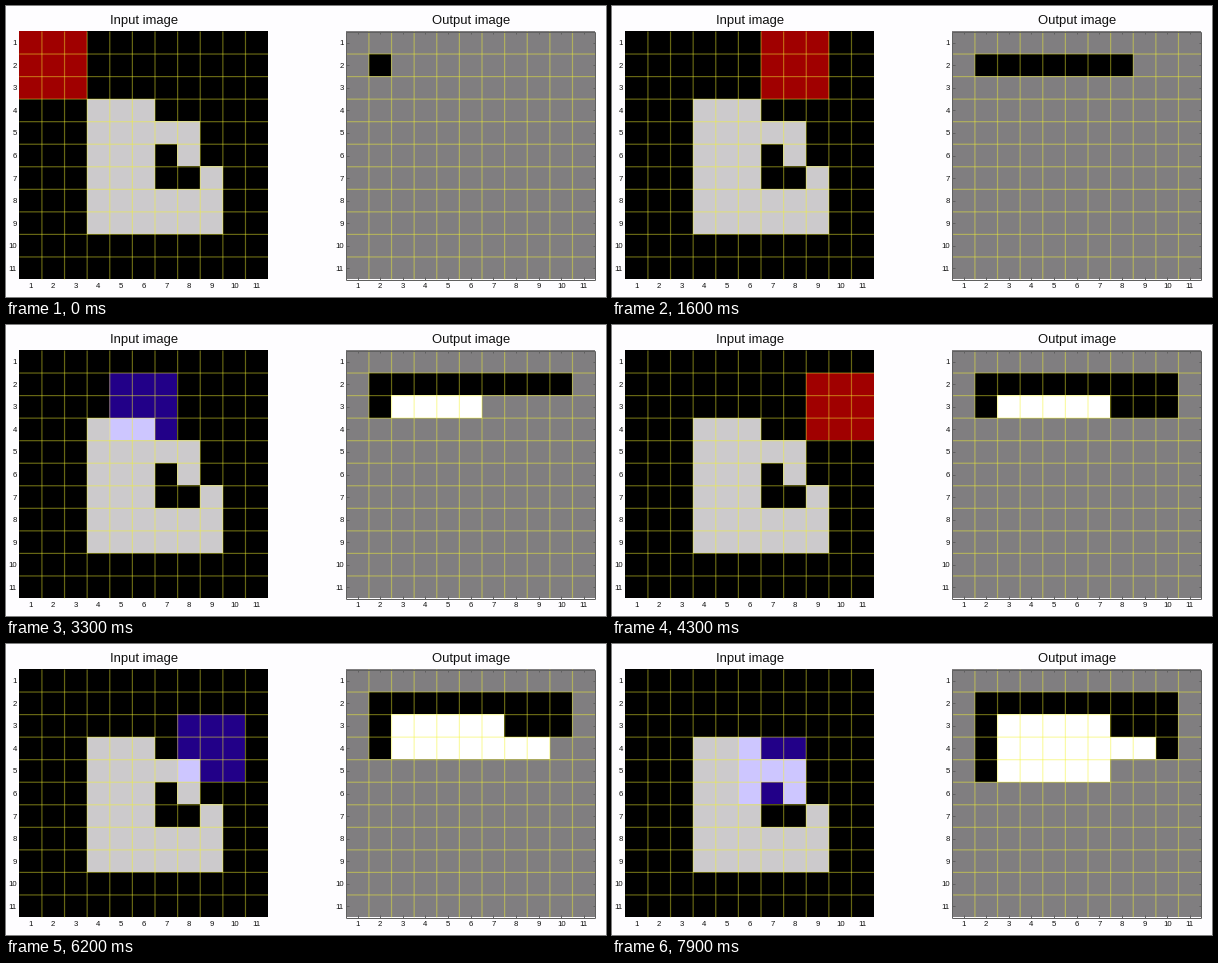
These frames come from a looping animation (600x291 px, 8 s). A matplotlib script:

```python
import numpy as np
import matplotlib.pyplot as plt
from matplotlib.animation import FuncAnimation

W, H, DPI = 600, 291, 100
N = 11                      # cells per side
INNER = N - 2               # window positions per row
TOP, BOTTOM = 25.5, 273.5
FRAMES, INTERVAL = 80, 100
STEP_MS = 250               # time per window position

PIXEL = 72 / DPI
DARK, LIGHT = (0, 0, 0), (204, 202, 204)
MISS = (160, 0, 0)
HIT_DARK, HIT_LIGHT = (34, 0, 136), (205, 198, 255)
UNSET, WHITE = (128, 126, 128), (255, 255, 255)

shape = np.zeros((N, N), bool)
shape[3:9, 3:6] = True
shape[4, 6:8] = True
shape[5, 7] = True
shape[6, 8] = True
shape[7:9, 6:9] = True

plt.rcParams["font.family"] = "Liberation Sans"
fig = plt.figure(figsize=(W / DPI, H / DPI), dpi=DPI, facecolor="#fefdff")
ax = fig.add_axes([0, 0, 1, 1])


def label(x, y, text, px, **kw):
    ax.text(x, y, text, fontsize=px * PIXEL, color="#101010",
            va="baseline", **kw)


def make_panel(left, title, ticks):
    """Draw one labelled grid and return its image."""
    right = left + 248.8
    img = ax.imshow(np.zeros((N, N, 3), np.uint8), interpolation="nearest",
                    extent=(left, right, BOTTOM, TOP), zorder=1)
    xs = np.linspace(left, right, N + 1)
    ys = np.linspace(TOP, BOTTOM, N + 1)
    grid = dict(color="#f4f430", lw=1.2 * PIXEL, alpha=0.42, snap=False,
                zorder=2)
    ax.vlines(xs[1:-1], TOP, BOTTOM, **grid)
    ax.hlines(ys[1:-1], left, right, **grid)

    cx, cy = (xs[1:] + xs[:-1]) / 2, (ys[1:] + ys[:-1]) / 2
    if ticks:
        edge = dict(color="#606060", lw=PIXEL, zorder=3)
        ax.vlines([left, right], TOP, BOTTOM, **edge)
        ax.hlines([TOP, BOTTOM], left, right, **edge)
        for start, end in ((TOP, TOP + 2.5), (BOTTOM - 2.5, BOTTOM)):
            ax.vlines(cx, start, end, **edge)
        for start, end in ((left, left + 2.5), (right - 2.5, right)):
            ax.hlines(cy, start, end, **edge)

    for i in range(N):
        label(cx[i], 282.4, str(i + 1), 7.8, ha="center")
        label(left - 2.5, cy[i] + 2.5, str(i + 1), 7.8, ha="right")
    label((left + right) / 2 + 0.4, 18, title, 13, ha="center")
    return img


input_img = make_panel(13.3, "Input image", False)
output_img = make_panel(340.3, "Output image", True)
ax.set_aspect("auto")
ax.set_xlim(0, W)
ax.set_ylim(H, 0)
ax.axis("off")


def window(step):
    r, c = divmod(step, INNER)
    return slice(r, r + 3), slice(c, c + 3)


def paint(mask, on, off):
    return np.where(mask[..., None], on, off).astype(np.uint8)


def update(frame):
    step = int(frame * INTERVAL / STEP_MS + 0.5)

    pic = paint(shape, LIGHT, DARK)
    win = window(step)
    part = shape[win]
    pic[win] = paint(part, HIT_LIGHT, HIT_DARK) if part.any() else MISS
    input_img.set_data(pic)

    out = np.full((N, N, 3), UNSET, np.uint8)
    for k in range(step + 1):
        r, c = divmod(k, INNER)
        out[r + 1, c + 1] = WHITE if shape[window(k)].any() else DARK
    output_img.set_data(out)
    return input_img, output_img


anim = FuncAnimation(fig, update, frames=FRAMES, interval=INTERVAL,
                     repeat=True, repeat_delay=0, blit=False)
plt.show()
```
